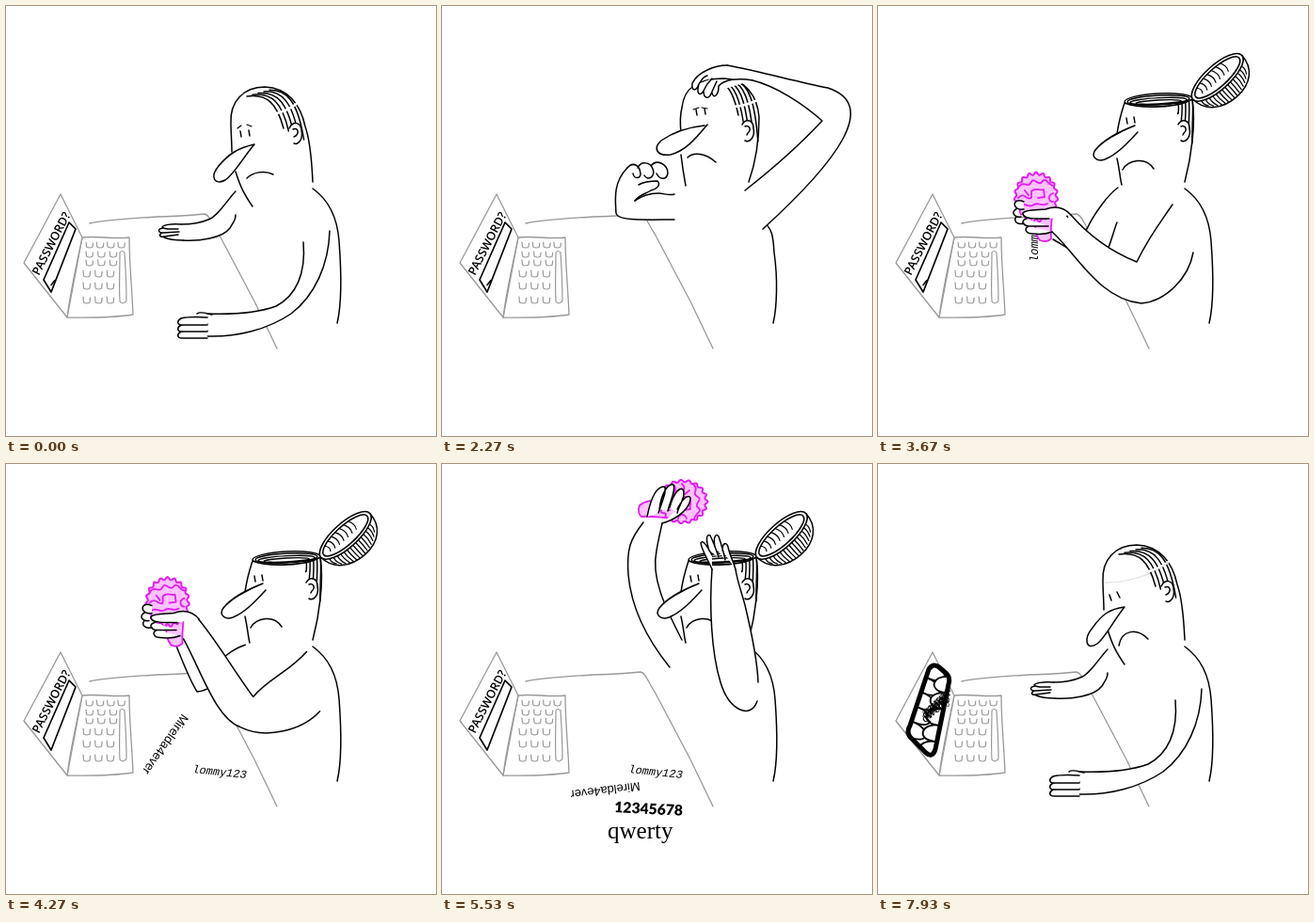
Animation, 457 px wide and 457 px high, one loop 8000 ms. Source, as an HTML page with a canvas:

```html
<!DOCTYPE html>
<html lang="en">
<head>
<meta charset="utf-8">
<title>Password?</title>
<style>
html,body{margin:0;width:100%;height:100%;overflow:hidden;background:#fff}
canvas{display:block;width:457px;height:457px}
</style>
</head>
<body>
<canvas id="c"></canvas>
<script>
const SIZE = 457, LOOP = 8000, TAU = Math.PI * 2, DEG = Math.PI / 180;
const cv = document.getElementById('c'), g = cv.getContext('2d');
const dpr = window.devicePixelRatio || 1;
cv.width = cv.height = SIZE * dpr;

const nums = s => s.match(/-?[\d.]+/g).map(Number);
const lerp = (a, b, k) => a + (b - a) * k;
const mixList = (a, b, k) => a.map((v, i) => lerp(v, b[i], k));
const clamp = v => Math.max(0, Math.min(1, v));
const ramp = (n, a, b) => clamp((n - a) / (b - a));
const ease = k => k * k * (3 - 2 * k);

// blends two path strings that share the same commands
function mix(a, b, k) {
  if (k <= 0) return a;
  if (k >= 1) return b;
  const q = nums(b);
  let i = 0;
  return a.replace(/-?[\d.]+/g, v => lerp(+v, q[i++], k).toFixed(2));
}
function span(keys, n) {
  let i = 0;
  while (i < keys.length - 2 && n >= keys[i + 1][0]) i++;
  return [keys[i], keys[i + 1], ramp(n, keys[i][0], keys[i + 1][0])];
}
function at(keys, n) {
  const [a, b, k] = span(keys, n);
  return mixList(a, b, k).slice(1);
}
function draw(d, fill, color = '#000', w = 1.5) {
  const p = new Path2D(d);
  if (fill) { g.fillStyle = fill; g.fill(p); }
  if (color) { g.strokeStyle = color; g.lineWidth = w; g.stroke(p); }
}
function local(x, y, rot, fn) {
  g.save();
  g.translate(x, y);
  g.rotate(rot);
  fn();
  g.restore();
}

// arms: edge from shoulder to hand, then edge from hand to shoulder
const front = {
  rest: ['M316,251 C319,285 308,308 287,319 C265,327 240,328 214,327', 'M214,351 C245,352 278,344 303,327 C328,308 343,275 344,239'],
  scratch: ['M322,196 C345,178 378,150 404,122 C385,105 355,85 330,79', 'M303,63 C340,70 375,80 410,87 C465,105 420,165 341,237'],
  top: ['M336,232 C335,205 328,175 322,150 C318,135 314,125 312,112', 'M287,112 C284,150 286,200 296,232 C305,262 328,272 335,252'],
  hold: ['M313,211 C300,230 288,245 275,272 C250,262 225,245 205,222', 'M185,240 C210,262 235,312 280,316 C305,314 330,290 335,262'],
  high: ['M322,195 C300,218 275,222 258,238 C240,205 220,160 200,138', 'M190,165 C205,200 218,255 238,266 C265,285 310,280 333,263'],
  gather: ['M303,216 C305,260 312,300 308,335 C304,365 298,382 285,396', 'M285,419 C315,415 336,370 340,330 C343,300 345,270 344,240'],
  push: ['M303,216 C270,232 235,240 208,246 C185,251 160,250 133,246', 'M131,262 C155,272 190,277 220,275 C255,271 290,265 314,257']
};
const back = {
  rest: ['M244,197 C236,205 225,224 215,227 C206,231 195,232 186,232', 'M188,249 C205,250 230,247 238,236 C243,228 244,226 244,222'],
  chin: ['M247,200 C241,202 236,199 230,199 C222,199 212,202 205,207', 'M197,172 C182,187 184,205 185,220 C186,229 220,227 247,227'],
  up: ['M255,187 C236,150 222,120 228,92 C230,80 232,72 234,63', 'M214,62 C200,80 196,90 198,118 C202,160 225,195 242,216'],
  in: ['M255,185 C240,150 240,95 255,82 C262,76 272,74 278,78', 'M275,58 C230,62 205,120 215,160 C220,185 230,200 242,216'],
  hold: ['M255,193 C245,200 230,220 222,237 C214,240 205,230 200,222', 'M186,248 C200,256 225,275 240,268 C247,255 250,240 254,230'],
  high: ['M254,192 C245,193 235,196 228,200 C215,190 205,170 200,160', 'M179,172 C184,195 185,215 189,232 C200,236 208,234 215,233'],
  push: ['M250,207 C232,220 210,240 180,244 C165,246 145,244 131,240', 'M133,250 C160,252 185,253 208,248 C235,242 250,238 258,234']
};
const frontHand = {
  scratch: 'M303,63 C290,63 272,70 266,82 C265,91 270,91 273,83 C277,76 279,75 282,74 M273,83 C270,93 274,97 278,90 C281,83 284,80 287,77 M278,90 C278,99 284,100 287,91 L292,80 M287,92 C288,99 294,96 294,85 C300,78 315,76 330,79',
  top: 'M287,112 C284,104 276,92 275,84 C277,80 281,86 287,97 M284,92 C280,80 281,74 285,76 C288,82 291,90 294,99 M290,88 C288,78 291,73 294,77 C297,86 299,92 301,102 M298,92 C298,84 302,82 304,88 C306,98 310,104 312,112',
  hold: 'M205,222 C196,212 186,213 178,216 C170,217 157,216 154,220 C154,225 160,226 170,226 L182,226 M158,226 C151,228 154,233 160,234 L181,234 M160,234 C154,237 158,242 164,242 C172,243 180,242 185,240 M155,208 C146,204 142,211 148,215 C151,217 153,216 155,216 M148,215 C140,219 145,225 152,224 M147,224 C143,229 149,233 155,231',
  push: 'M133,246 C122,250 122,260 131,262 M131,262 C122,262 115,266 118,269 C122,272 130,270 134,266'
};
const backHand = {
  rest: 'M186,232 C175,231 167,233 166,235 C168,238 175,237 183,237 M167,236 C160,237 162,241 167,241 L184,240 M166,241 C162,243 163,246 168,245 L183,243 M168,246 C175,249 185,249 188,249',
  chin: 'M197,172 C203,165 210,169 211,178 C211,184 204,184 203,178 M208,172 C211,165 221,165 224,173 C227,181 219,187 215,180 M222,170 C228,162 240,168 240,178 C238,186 231,184 228,178 M209,190 C214,187 222,186 229,186 C233,190 228,195 222,196 C216,200 210,200 205,207',
  up: 'M218,56 C222,36 228,24 236,24 C240,26 234,40 230,52 M231,48 C233,32 240,20 246,22 C249,28 242,40 240,50 M242,46 C246,32 252,24 256,27 C260,33 252,44 250,52 M250,48 C256,36 262,32 264,36 C264,46 252,58 234,63',
  push: 'M131,240 C124,240 122,247 133,250'
};
const sameHand = { high: 'hold', gather: 'rest', in: 'up' };
const frontKeys = [[0, 'rest'], [26, 'rest'], [30, 'scratch'], [46, 'scratch'], [49, 'top'], [50, 'top'], [53, 'hold'], [55, 'hold'], [79, 'high'], [82, 'top'], [85, 'top'], [87, 'scratch'], [89, 'scratch'], [92, 'gather'], [94, 'gather'], [98, 'push'], [104, 'push'], [109, 'rest'], [120, 'rest']];
const backKeys = [[0, 'rest'], [24, 'rest'], [29, 'chin'], [44, 'chin'], [47, 'in'], [49, 'up'], [53, 'hold'], [55, 'hold'], [79, 'high'], [82, 'up'], [84, 'up'], [87, 'in'], [88, 'in'], [91, 'rest'], [94, 'rest'], [98, 'push'], [104, 'push'], [108, 'rest'], [120, 'rest']];

const shake = n => .5 - .5 * Math.cos(TAU * (n - 55) / 6.8);
const wrist = pose => {
  const u = nums(pose[0]), l = nums(pose[1]);
  return [(u[12] + l[0]) / 2, (u[13] + l[1]) / 2];
};
function armAt(poses, keys, n) {
  const [a, b, t] = span(keys, n);
  const k = n >= 55 && n < 79 ? shake(n) : ease(t);
  const p = poses[a[1]], q = poses[b[1]];
  const name = k < .5 ? a[1] : b[1];
  return { edges: [mix(p[0], q[0], k), mix(p[1], q[1], k)], hand: sameHand[name] || name };
}
function drawArm(arm) {
  const [u, l] = arm.edges;
  draw(u + l.replace('M', 'L'), '#fff', null);
  draw(u + l);
}
function drawHand(arm, poses, hands, dx = 0, dy = 0) {
  if (!hands[arm.hand]) return;
  const w = wrist(arm.edges), r = wrist(poses[arm.hand]);
  local(w[0] - r[0] + dx, w[1] - r[1] + dy, 0, () => draw(hands[arm.hand], '#fff'));
}
function flatHand(arm, n) {
  const [x, y] = wrist(arm.edges);
  const tap = n >= 7 && n <= 20;
  for (let j = 2; j >= 0; j--) {
    const lift = tap ? .45 * Math.max(0, Math.sin((n - 7) * 1.2 - j * 1.1)) : 0;
    local(x, y - 4 + j * 7, lift, () => draw('M0,-4 C-14,-5 -24,-4 -28,-3 C-33,0 -32,4 -27,4 L0,4', '#fff'));
  }
  draw(`M${x - 11},${y - 12} C${x - 8},${y - 15} ${x},${y - 12} ${x + 5},${y - 11}`);
}

// head: a looking down, d looking down and sad, b upright, c opened
const downOutline = 'M240,155 C240,145 239,134 239,124 C238,102 252,86 275,86 C300,87 313,105 318,128 C323,142 325,165 326,187 M244,176 C249,192 253,200 262,213';
const downEar = 'M301,130 C305,122 313,123 314,132 C316,141 311,148 306,146 M305,131 C310,129 312,134 308,138 L306,139';
const upEar = 'M319,126 C323,119 331,121 331,130 C333,139 327,146 322,143 M322,128 C327,126 329,132 325,135 L324,137';
const heads = {
  a: { outline: downOutline, nose: 'M264,147 C246,151 236,158 226,170 C216,182 222,191 233,185 C243,178 252,161 264,147', ear: downEar, mouth: 'M256,183 C262,177 274,174 284,179', eyes: 'M249,133 L250,139 M258,132 L259,138' },
  d: { outline: downOutline, nose: 'M262,152 C246,154 238,160 228,174 C218,186 221,199 233,191 C241,185 250,167 262,152', ear: downEar, mouth: 'M256,193 C259,176 275,174 287,186', eyes: 'M246,139 L248,145 M254,136 L257,142' },
  b: { outline: 'M254,136 C253,125 253,115 255,108 C257,88 270,77 300,77 C322,78 335,95 337,118 C337,145 332,170 326,187 M254,158 C256,175 257,180 259,191', nose: 'M279,127 C260,129 243,136 233,143 C224,151 228,160 243,158 C258,154 268,143 282,126', ear: upEar, mouth: 'M261,161 C267,155 280,156 291,166', eyes: 'M270,110 L271,116 M279,109 L280,115' },
  c: { outline: 'M254,136 C256,122 259,112 262,103 C280,110 320,108 334,99 C338,125 333,160 326,187 M254,162 C257,175 257,182 259,190', nose: 'M273,127 C255,134 238,144 231,153 C226,160 232,166 241,163 C254,158 266,145 276,134', ear: upEar, mouth: 'M260,174 C266,163 285,160 293,173', eyes: 'M264,119 L265,125 M272,118 L273,124' }
};
function drawHead(n) {
  const open = n >= 44 && n < 88;
  const late = n >= 88;
  const up = late ? 1 - ramp(n, 88, 91) : ramp(n, 21, 26);
  const part = k => open ? heads.c[k] : mix(heads[late ? 'd' : 'a'][k], heads.b[k], up);
  draw(part('outline'), '#fff');
  if (open) {
    for (let i = 0; i < 5; i++) {
      const x = 319 + i * 3.8;
      draw(`M${x},${103 - i * .8} C${x + 1},110 ${x},116 ${x - .5},${114 + i * 8}`);
    }
  } else {
    for (let i = 0; i < 5; i++) {
      const a = `M${256 + 6 * i},${96 - 1.7 * i} C${278 + 5 * i},${93 - i} ${288 + 5.4 * i},${104 - i} ${295 + 5.4 * i},${130 + 3 * i}`;
      const b = `M${299 + 3 * i},${83 - i} C${306 + 5 * i},${86 - i} ${311 + 5.4 * i},${98 + i} ${315 + 5.2 * i},${116 + 7 * i}`;
      draw(mix(a, b, up));
    }
    draw(mix('M288,114 Q300,111 310,103', 'M308,107 Q320,107 333,101', up), null, '#fff', 2.5);
    if (late) {
      g.globalAlpha = n < 104 ? 1 : Math.max(.12, 1 - (n - 103) / 14);
      draw(mix('M242,126 C262,126 290,120 309,104', 'M254,108 C272,112 310,110 336,100', up), null, '#000', 1.3);
      g.globalAlpha = 1;
    }
  }
  draw(part('ear'), '#fff');
  draw(part('nose'), '#fff');
  draw(part('mouth'));
  const look = n >= 7 && n <= 20 ? [0, -1.5, -1.5, 0, 2, 2][Math.floor((n - 7) / 2.4)] || 0 : 0;
  g.save();
  g.translate(look, 0);
  draw(part('eyes'));
  if (!late && !open) draw(mix('M246,130 L250,127 M256,126 L261,128', 'M267,110 L273,108 M276,108 L282,109', up), null, '#000', 1.2);
  g.restore();
}

function drawRim() {
  local(298, 100, -3 * DEG, () => {
    for (const [rx, ry, y] of [[36, 7, 0], [33, 5, 0], [30, 3.4, 1], [24, 2, 2]]) {
      g.beginPath();
      g.ellipse(0, y, rx, ry, 0, 0, TAU);
      g.fillStyle = '#fff'; g.fill();
      g.strokeStyle = '#000'; g.lineWidth = 1.4; g.stroke();
    }
  });
}
function drawLid(n) {
  if (n < 44 || n >= 88) return;
  const k = Math.min(ramp(n, 43, 47), 1 - ramp(n, 85, 88));
  const a = lerp(180, 318, ease(k)) * DEG;
  local(334 + 36 * Math.cos(a), 100 + 36 * Math.sin(a), a, () => {
    draw('M-35,0 C-34,18 -18,29 2,29 C22,29 35,18 35,0', '#fff');
    for (let i = 0; i < 15; i++) {
      const x = -29 + i * 4, e = Math.sqrt(1 - (x / 35) ** 2);
      draw(`M${x},${13 * e} Q${x * 1.06},${20 * e} ${x * .94},${28 * e}`, null, '#000', 1.3);
    }
    g.beginPath(); g.ellipse(0, 0, 35, 13, 0, 0, TAU);
    g.fillStyle = '#fff'; g.fill(); g.lineWidth = 1.6; g.stroke();
    g.beginPath(); g.ellipse(0, 0, 31, 10, 0, 0, TAU); g.stroke();
    for (let i = 0; i < 7; i++) {
      const x = -24 + i * 6, e = Math.sqrt(1 - (x / 31) ** 2);
      draw(`M${x},${-10 * e} Q${x + 4},${-3 * e} ${x + 1},${3 * e}`, null, '#000', 1.2);
    }
  });
}

const PINK = '#e01df0', PALE = '#fbc3ff';
const brainKeys = [[47, 297, 125, 0], [49, 262, 44, 90], [53, 168, 203, 0], [55, 168, 203, 0], [79, 173, 125, 0], [82, 256, 40, 90], [84, 256, 40, 90], [87, 297, 125, 90], [88, 297, 130, 90]];
function drawBrain(n) {
  if (n < 47 || n >= 88) return;
  let [x, y, r] = at(brainKeys, n);
  if (n >= 55 && n < 79) { x = 168 + 5 * shake(n); y = 203 - 78 * shake(n); }
  local(x, y, r * DEG, () => {
    draw('M-3,18 C0,30 -3,38 4,46 C9,48 14,47 16,44 C15,34 17,25 17,16', PALE, PINK, 1.8);
    g.beginPath();
    for (let i = 0; i <= 120; i++) {
      const a = i / 120 * TAU, w = 1 + .06 * Math.sin(a * 19);
      g.lineTo(22 * w * Math.cos(a), 25 * w * Math.sin(a));
    }
    g.closePath();
    g.fillStyle = PALE; g.fill();
    g.strokeStyle = PINK; g.lineWidth = 2; g.stroke();
    draw('M-19,-10 C-13,-19 -9,-8 -5,-16 C-2,-22 3,-10 7,-17 C11,-21 13,-12 19,-12 M-19,1 C-12,-6 -11,4 -5,1 L-5,-6 C0,-11 4,-6 8,-8 L9,0 L2,1 M18,-4 C12,-2 13,5 18,5 M-17,9 C-10,5 -8,13 -2,8 C3,5 6,11 12,7 M-9,18 C-4,13 3,20 9,14 M-12,-7 L-8,-2', null, PINK, 1.8);
  });
}

// keys: step, x, y, angle, size
const words = [
  { text: 'lommy123', font: 'italic S "Liberation Mono",monospace', keys: [[53, 170, 235, -90, 12], [55, 170, 272, -90, 12], [58, 174, 325, -50, 12], [61, 198, 328, 6, 12], [94, 198, 328, 6, 12], [99, 68, 270, -18, 13]] },
  { text: 'Mirelda4ever', font: 'S "Liberation Sans",sans-serif', keys: [[60, 172, 176, 90, 12.9], [62, 172, 195, 95, 12.9], [65, 195, 300, 140, 12.9], [67, 210, 338, 173, 12.9], [94, 210, 338, 173, 12.9], [99, 130, 236, 162, 12]] },
  { text: 'qwerty', font: 'S "Liberation Serif",serif', keys: [[66, 158, 235, 0, 13], [72, 145, 326, 0, 20], [76, 176, 398, 0, 25], [94, 176, 398, 0, 25], [99, 66, 272, -16, 23]] },
  { text: '12345678', font: '900 S Lato,sans-serif', keys: [[74, 158, 225, 0, 8], [80, 183, 370, 3, 15.7], [94, 183, 370, 3, 15.7], [99, 74, 264, -18, 12]] }
];
function drawWords(n) {
  g.fillStyle = '#000';
  const copies = n >= 98 ? 2 : 1;
  for (const w of words) {
    if (n < w.keys[0][0]) continue;
    const [x, y, r, size] = at(w.keys, n);
    g.font = w.font.replace('S', size.toFixed(2) + 'px');
    for (let i = 0; i < copies; i++) local(x + i * 4, y - i * 7, r * DEG, () => g.fillText(w.text, 0, 0));
  }
}

const GREY = '#999';
function drawDesk() {
  draw('M89,231 C105,227 130,226 160,224 C180,224 200,222 211,221 C217,222 220,234 226,242 L264,314 L288,364', null, GREY, 1.3);
  draw('M81,246 C95,244 115,248 131,246 C131,275 134,300 135,328 C110,332 85,331 65,331 Z', '#fff', GREY, 1.3);
  draw('M58,200 L19,273 L65,331 C68,305 76,270 81,246 Z', '#fff', GREY, 1.3);
  [251, 261, 270, 281, 294, 309].forEach((y, r) => {
    const h = r < 3 ? 5 : 6;
    for (let i = 0; i < (r ? 3 : 4); i++) {
      const x = (r < 3 ? 85 : 82) + i * (r ? 12.6 : 11.3);
      draw(`M${x},${y} L${x + .5},${y + h} Q${x + 4},${y + h + 2} ${x + 7},${y + h} L${x + 7.5},${y + 1}`, null, GREY, 1.2);
    }
  });
  draw('M121,262 C121,280 120,298 121,314 C123,317 127,316 128,313 C128,295 127,278 126,262 Q123,259 121,262', null, GREY, 1.2);
}
function drawScreen(n) {
  if (n >= 103) return drawMouth(n);
  g.fillStyle = '#000';
  g.font = '600 12.5px "Open Sans",sans-serif';
  local(35, 287, -62.5 * DEG, () => g.fillText('PASSWORD?', 0, 0));
  draw('M40,291 L48,304 L74,237 L67,230 Z', null, '#000', 1.7);
  if (Math.floor((n + 4) / 9) % 2 === 0) draw('M48,296.5 L52,291.5', null, '#000', 1.6);
}

const LIPS = 'M54,218 Q59,211 65,216 L73,223 Q77,227 75,234 L61,303 Q58,313 51,307 L34,290 Q30,285 34,278 Z';
// a row of teeth along the line from p to q, pointing by d
function teeth(p, q, d, count) {
  for (let i = 0; i < count; i++) {
    const a = mixList(p, q, i / count), b = mixList(p, q, (i + 1) / count);
    draw(`M${a} C${a[0] + d[0]},${a[1] + d[1]} ${b[0] + d[0]},${b[1] + d[1]} ${b}`, '#fff', '#000', 1.8);
  }
}
function drawMouth(n) {
  const chew = n < 106 ? 1 : .85 + .15 * Math.cos((n - 119) * 1.5);
  local(54, 262, -72 * DEG, () => {
    g.scale(1, chew * ramp(n, 101, 105));
    g.rotate(72 * DEG);
    g.translate(-54, -262);
    draw(LIPS, '#fff', null);
    g.save();
    g.clip(new Path2D(LIPS));
    teeth([33, 290], [58, 212], [20, 9], 5);
    teeth([56, 312], [76, 226], [-19, -2], 5);
    g.restore();
    draw(LIPS, null, '#000', 5);
  });
  // the heap slides in, then is chewed
  const k = ease(ramp(n, 103, 107)), wob = n > 106 ? Math.sin((n - 119) * 2.1) * 2 : 0;
  const s = lerp(1, .56, k);
  g.save();
  g.translate(lerp(99, 62, k) + wob, lerp(251, 257, k) - wob);
  g.rotate(-25 * DEG * k + wob * .04);
  g.scale(s, s);
  g.translate(-99, -251);
  drawWords(n);
  g.restore();
}

function render(t) {
  const n = Math.floor(t * .015 + .1) % 120;
  g.setTransform(dpr, 0, 0, dpr, 0, 0);
  g.fillStyle = '#fff';
  g.fillRect(0, 0, SIZE, SIZE);
  g.lineCap = g.lineJoin = 'round';
  drawDesk();
  drawScreen(n);
  if (n < 103) drawWords(n);

  const f = armAt(front, frontKeys, n), b = armAt(back, backKeys, n);
  const scratching = n >= 30 && n < 44;
  if (n >= 44 && n < 88) drawRim();
  drawArm(b);
  drawBrain(n);
  drawHand(b, back, backHand, 0, scratching ? Math.sin((n - 34) * 1.3) * 1.2 : 0);
  drawHead(n);
  draw(f.hand === 'scratch'
    ? 'M341,229 C351,236 352,245 353,262 C357,290 356,320 352,337'
    : 'M326,194 C340,204 352,222 354,250 C357,290 356,320 352,337');
  drawLid(n);
  drawArm(f);
  if (f.hand === 'rest') flatHand(f, n);
  else drawHand(f, front, frontHand, scratching ? Math.sin((n - 34) * 1.6) * 3 : 0, 0);
}

const start = performance.now();
function tick(now) {
  render(Math.max(0, now - start) % LOOP);
  requestAnimationFrame(tick);
}
render(0);
requestAnimationFrame(tick);
</script>
</body>
</html>
```
